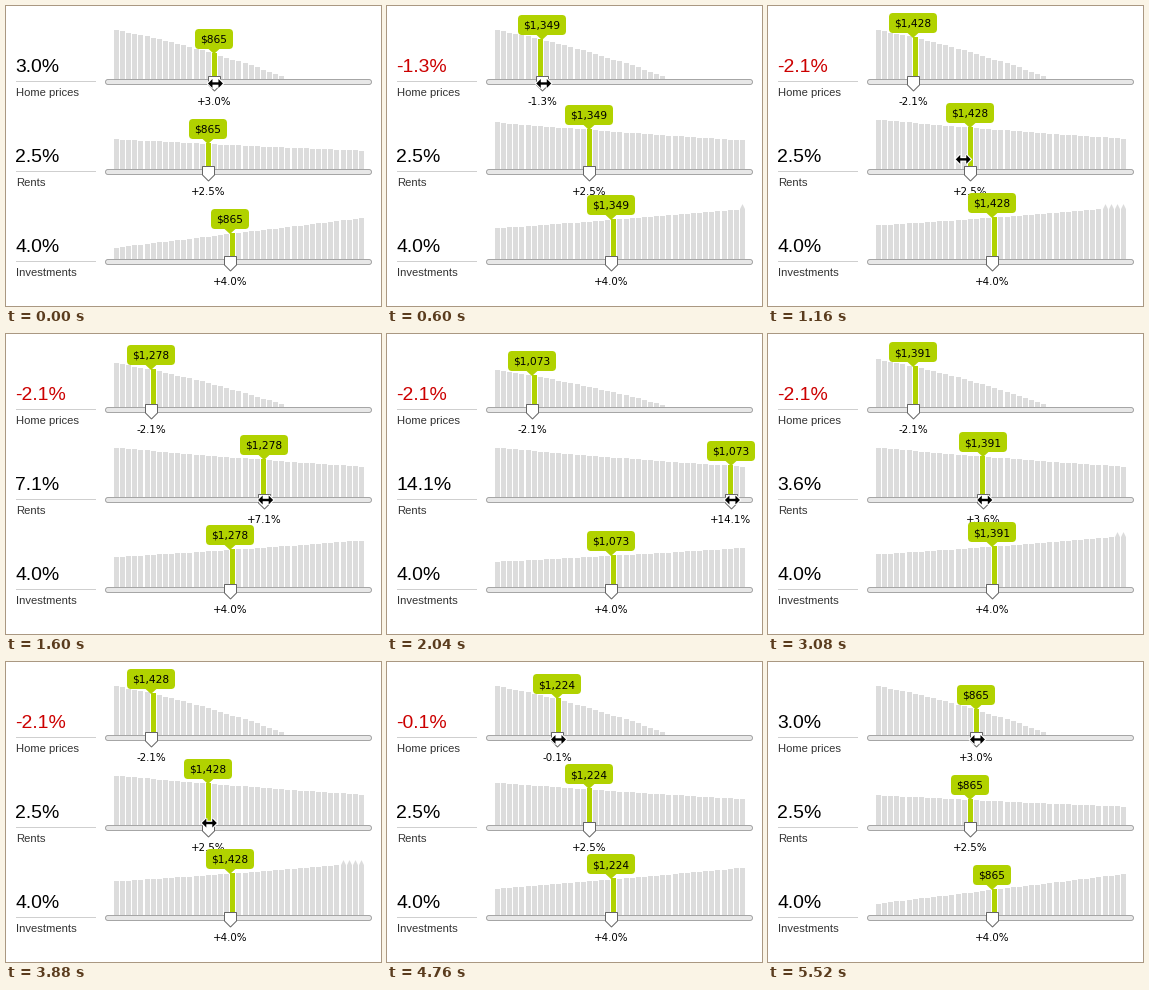
These frames come from a looping animation (375x300 px, 5.56 s). A matplotlib script:

```python
import numpy as np
import matplotlib.pyplot as plt
from matplotlib.animation import FuncAnimation
from matplotlib.collections import PolyCollection
from matplotlib.patches import FancyBboxPatch, Polygon, Rectangle
from matplotlib.patheffects import withStroke

W, H, DPI = 375, 300, 100
STEP, FRAMES = 40, 139
GREEN, GRAY, RED = "#b1d200", "#dcdcdc", "#cc0000"
SCALE = 34.5      # dollars per pixel of bar height
CAP = 1721.5      # taller bars are cut off and get a peak
BAR_W, BAR_STEP = 5, 6.125
INVEST_X = 224.5

RATES = np.arange(-5, 15.1, 0.5)
BAR_LEFT = np.round(107.9 + BAR_STEP * np.arange(len(RATES)))
BAR_X = 110.4 + BAR_STEP * np.arange(len(RATES))


def linear(u):
    return u


def smooth(u):
    return u * u * (3 - 2 * u)


def ease_out(power):
    return lambda u: 1 - (1 - u) ** power


# Drags as (start ms, end ms, new rate, easing)
HOME_DRAGS = [(240, 760, -2.1, ease_out(1.57)), (4400, 5320, 2.9, linear),
              (5480, 5520, 3.0, linear)]
RENT_DRAGS = [(1265, 2040, 14.1, smooth), (2080, 3880, 2.5, ease_out(2.9))]


def rate_at(t, rate, drags):
    for start, end, goal, ease in drags:
        u = np.clip((t - start) / (end - start), 0, 1)
        rate += (goal - rate) * ease(u)
    return round(float(rate), 1) + 0.0


def slider_x(rate):
    return 171.7 + 2 * BAR_STEP * rate


def home_cost(h):
    return np.maximum(1213.2 - 108 * h - 2.7 * h**2, 0)


def rent_factor(r):
    return 1 + (-35.34 * (r - 2.5) + 0.285 * (r**2 - 6.25)) / 1428


def invest_cost(h, x):
    d, u = x - INVEST_X, h + 2.1
    slope = 2.56 + 0.12 * u + 0.0365 * u**2
    bend = 0.0017 * (1 - u / 5.1)
    return home_cost(h) + slope * d + bend * d**2


fig = plt.figure(figsize=(W / DPI, H / DPI), dpi=DPI, facecolor="white")
ax = fig.add_axes([0, 0, 1, 1])
ax.set(xlim=(0, W), ylim=(H, 0))
ax.axis("off")


def text(x, y, s, px, z, font="Liberation Sans", **kw):
    return ax.text(x, y, s, fontsize=px * 72 / DPI, family=font,
                   va="baseline", zorder=z, **kw)


def shape(patch, z, **kw):
    patch.set(zorder=z, **kw)
    return ax.add_patch(patch)


def bar_shapes(costs, base):
    verts = []
    for left, cost in zip(BAR_LEFT, costs):
        height = min(cost, CAP) / SCALE
        if height < 1:
            continue
        right, top = left + BAR_W, base - height
        peak = [(left + BAR_W / 2, top - 5)] if cost > CAP else []
        verts.append([(left, base), (left, top), *peak, (right, top), (right, base)])
    return verts


class Row:
    def __init__(self, name, base, z):
        self.base = base
        shape(Rectangle((10, base + 2), 80, 1), z, fc="#cfcfcf", ec="none")
        text(10, base + 17, name, 11.3, z, color="#333333")
        self.big = text(9.5, base - 7.5, "", 19.4, z)
        self.bars = PolyCollection([], facecolors=GRAY, edgecolors="none", zorder=z)
        ax.add_collection(self.bars)
        track = FancyBboxPatch((99.5, base + 0.5), 266, 5,
                               boxstyle="round,pad=0,rounding_size=2.5")
        shape(track, z + 1, fc="#e8e8e8", ec="#a6a6a6", lw=0.72)
        self.line = shape(Rectangle((0, 0), BAR_W, 1), z + 2, fc=GREEN, ec="none")
        self.handle = shape(Polygon([(0, 0)]), z + 3, fc="white", ec="#666666", lw=0.72)
        self.small = text(0, base + 25.8, "", 10.2, z + 3, "DejaVu Sans", ha="center")
        self.tip = shape(Polygon([(0, 0)]), z + 4, fc=GREEN, ec="none")
        self.bubble = FancyBboxPatch((0, 0), 48, 20,
                                     boxstyle="round,pad=0,rounding_size=4")
        shape(self.bubble, z + 4, fc=GREEN, ec="none")
        self.money = text(0, 0, "", 10.6, z + 5, "DejaVu Sans", ha="center")

    def update(self, rate, x, cost, costs):
        b = self.base
        top = round(b - cost / SCALE - 0.1)
        nearest = BAR_LEFT[np.argmin(abs(BAR_X - x))]
        x = int(x)
        self.bars.set_verts(bar_shapes(costs, b))
        self.big.set(text=f"{rate:.1f}%", color=RED if rate < 0 else "black")
        self.small.set(text=f"{rate:+.1f}%", x=x)
        self.handle.set_xy([(x - 5.5, b - 2.5), (x + 6.5, b - 2.5), (x + 6.5, b + 6),
                            (x + 0.5, b + 12), (x - 5.5, b + 6)])
        self.line.set_bounds(nearest, top - 1, BAR_W, b - top + 1)
        width = 38 if cost < 999.5 else 48
        self.bubble.set_bounds(x - width / 2, top - 25, width, 20)
        self.tip.set_xy([(x - 6, top - 5.5), (x + 6, top - 5.5), (x, top)])
        self.money.set(text=f"${cost:,.0f}", x=x, y=top - 11)


home = Row("Home prices", 73, 10)
rent = Row("Rents", 163, 20)
invest = Row("Investments", 253, 30)

half = [(-7.5, 0), (-3, -4.5), (-3, -1.2), (3, -1.2), (3, -4.5)]
ARROW = np.array(half + [(-x, -y) for x, y in half])
cursor = shape(Polygon(ARROW), 50, fc="black", ec="none",
               path_effects=[withStroke(linewidth=1.6, foreground="white")])


def draw(n):
    t = n * STEP
    h, r = rate_at(t, 3.0, HOME_DRAGS), rate_at(t, 2.5, RENT_DRAGS)
    k = rent_factor(r)
    cost = home_cost(h) * k
    hx, rx = slider_x(h), slider_x(r)
    home.update(h, hx, cost, home_cost(RATES) * k)
    rent.update(r, rx, cost, home_cost(h) * rent_factor(RATES))
    invest.update(4.0, INVEST_X, cost, invest_cost(h, BAR_X) * k)

    # The pointer glides to the rent slider and back
    w = np.interp(t, [920, 1200, 4160, 4400], [0, 1, 1, 0])
    lift = np.interp(t, [3760, 3880, 4160, 4400], [0, 5, 5, 0])
    cursor.set_xy(ARROW + [hx + w * (rx - hx) + 1, 77.5 + 88.5 * w - lift])
    return []


anim = FuncAnimation(fig, draw, frames=FRAMES, interval=STEP,
                     init_func=lambda: draw(0), repeat=True, repeat_delay=0)
plt.show()
```
